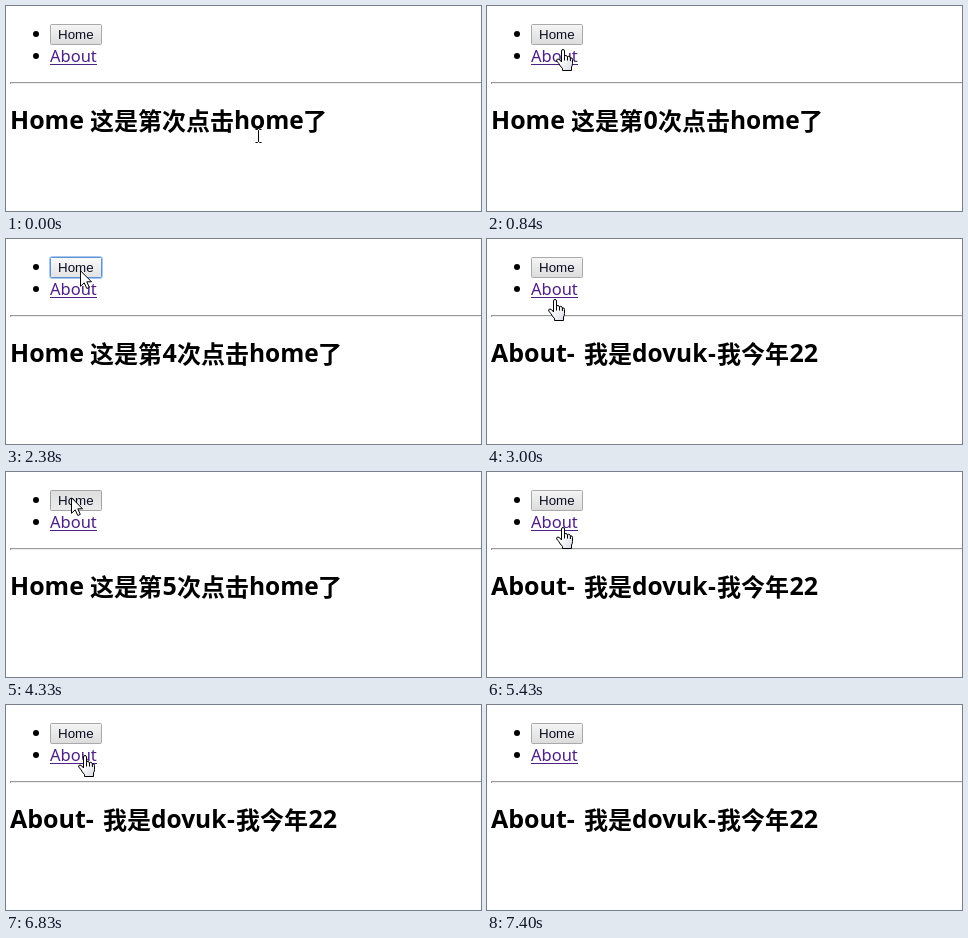
Write an HTML page that moves like this. It is 475 px wide and 205 px high and loops after 8.08 s.

```html
<!DOCTYPE html>
<html lang="zh-CN">
<head>
<meta charset="utf-8">
<title>Home / About</title>
<style>
  html, body { margin: 0; width: 100%; height: 100%; overflow: hidden; background: #fff; }
  svg { display: block; width: 475px; height: 205px; }
  text { font-family: "Open Sans", "Noto Sans", "Noto Sans CJK SC", "Noto Sans CJK", sans-serif; white-space: pre; }
  #title { font-size: 24px; font-weight: 700; }
  #title .latin { font-size: 24.5px; }
  #title .lead { font-size: 25px; }
  .link { font-family: "Noto Sans", "Open Sans", sans-serif; font-size: 16.5px; fill: #4f2085; }
  .label { font-family: "Liberation Sans", Arial, sans-serif; font-size: 13.333px; fill: #0c0c22; }
  #face { fill: url(#normal); stroke: #a9a9a9; }
  .hover #face { fill: url(#over); stroke: #989898; }
  .press #face { fill: url(#down); stroke: #a4a4a4; }
  .focus #face { stroke: #5b92d2; }
  #glow { fill: none; stroke: #a9c8ee; visibility: hidden; }
  .focus #glow { visibility: visible; }
  .cursor { visibility: hidden; stroke: #000; fill: #fff; stroke-linejoin: round; }
  .cursor.on { visibility: visible; }
  #hand { fill: url(#palm); }
</style>
</head>
<body>
<svg viewBox="0 0 475 205">
  <defs>
    <linearGradient id="normal" x2="0" y2="1"><stop stop-color="#f5f5f5"/><stop offset="1" stop-color="#dcdcdc"/></linearGradient>
    <linearGradient id="over" x2="0" y2="1"><stop stop-color="#fafafa"/><stop offset="1" stop-color="#e2e2e2"/></linearGradient>
    <linearGradient id="down" x2="0" y2="1"><stop stop-color="#dedede"/><stop offset="1" stop-color="#ececec"/></linearGradient>
    <linearGradient id="palm" y2="1"><stop offset=".4" stop-color="#fff"/><stop offset="1" stop-color="#d9dbe4"/></linearGradient>
  </defs>

  <circle cx="30" cy="28" r="3"/>
  <circle cx="30" cy="50" r="3"/>

  <g id="button">
    <rect id="glow" x="43.5" y="17.5" width="53" height="22" rx="2"/>
    <rect id="face" x="44.5" y="18.5" width="51" height="20" rx="1"/>
    <text class="label" x="52" y="33">Home</text>
  </g>

  <text class="link" x="44" y="56">About</text>
  <rect class="link" x="44" y="58" width="47" height="1"/>

  <path fill="#9a9a9a" d="M4 76H475V77H5V78H4Z"/>
  <rect x="5" y="77" width="470" height="1" fill="#eee"/>

  <text id="title"></text>

  <g class="cursor" id="beam">
    <path fill="none" d="M-3.5-6.5H-1.5L-.5-5.5 .5-6.5H2.5M-.5-5.5V5.5M-3.5 6.5H-1.5L-.5 5.5 .5 6.5H2.5"/>
  </g>
  <g class="cursor" id="arrow">
    <path d="M.5 .8V16.3L4.2 12.8 6.8 18.5 9.3 17.4 6.8 11.8H11.5Z"/>
  </g>
  <g class="cursor" id="hand">
    <path d="M-.5 13V2Q-.5 .5 1 .5T2.5 2V7.5Q2.7 6.3 4 6.5T5.5 8Q6 7 7.2 7.4T8.3 9Q10.5 8.2 10.5 10.5V14.5Q10.5 16.5 9.5 18V21.5H.5V19.5Q-2 17-3.2 14.5L-5.3 12Q-5.8 10.2-4 10-2.2 10.2-.5 13Z"/>
    <path fill="none" d="M2.5 7.5V11.5M5.5 8V11.5M8.4 9V12"/>
  </g>
</svg>
<script>
const LOOP = 8080;
const $ = id => document.getElementById(id);

// [time, kind, x, y], x and y at the hot spot
const moves = [
  [0, 'beam', 253, 130], [70, 'arrow', 214, 92], [130, 'arrow', 165, 68],
  [190, 'arrow', 124, 50], [250, 'arrow', 98, 40], [310, 'arrow', 84, 33],
  [510, 'arrow', 80, 32], [760, 'arrow', 76, 37], [840, 'hand', 75, 43],
  [1010, 'arrow', 75, 36], [1080, 'arrow', 74, 33], [1150, 'arrow', 74, 31],
  [2530, 'arrow', 74, 32], [2700, 'hand', 67, 60],
  [3170, 'hand', 67, 52], [3250, 'arrow', 66, 37], [3320, 'arrow', 65, 30], [3390, 'arrow', 65, 25],
  [4950, 'arrow', 70, 37], [5030, 'hand', 75, 53], [5200, 'hand', 75, 55],
  [5580, 'hand', 76, 50], [5650, 'arrow', 76, 38], [5730, 'arrow', 76, 35], [5800, 'arrow', 76, 33],
  [6590, 'arrow', 77, 37], [6660, 'hand', 78, 50],
  [7300, 'arrow', 102, 54], [7400, 'none', 0, 0]
];

const pages = [
  [0, ''], [670, '0'], [1380, '1'], [1690, '2'], [2070, '3'], [2380, '4'],
  [2930, 'about'], [3960, '5'], [4490, '6'], [4870, '7'],
  [5350, 'about'], [6130, '8'], [6360, '9'], [6830, 'about']
];

const presses = [
  [590, 670], [1320, 1380], [1610, 1690], [1940, 2070], [2250, 2380],
  [3860, 3960], [4330, 4490], [4790, 4870], [5960, 6130]
];
const focus = [[1690, 2930], [4870, 5350], [6360, 6830]];

const current = (track, t) => track.findLast(step => step[0] <= t);
const within = (spans, t) => spans.some(([from, to]) => t >= from && t < to);

function homeRuns(count) {
  const shift = count ? 15 : 0;
  return [
    [4, 'Home'], [84, '这是第'], [156.5, count], [156 + shift, '次点击'],
    [228 + shift, 'home'], [297 + shift, '了']
  ];
}

const aboutRuns = [
  [4, 'About-'], [97, '我是'], [145, 'dovuk'], [221, '-'], [230, '我今年'], [302.5, '22']
];

let shown = null;
function showPage(page) {
  if (page === shown) return;
  shown = page;
  const runs = page === 'about' ? aboutRuns : homeRuns(page);
  $('title').replaceChildren(...runs.filter(run => run[1]).map(([x, text]) => {
    const span = document.createElementNS('http://www.w3.org/2000/svg', 'tspan');
    const latin = /^[\w-]+$/.test(text);
    span.setAttribute('x', x);
    span.setAttribute('y', latin ? 123 : 123.5);
    if (latin) span.setAttribute('class', /^[A-Z\d]/.test(text) ? 'lead' : 'latin');
    span.textContent = text;
    return span;
  }));
}

function draw(t) {
  showPage(current(pages, t)[1]);

  const [, kind, x, y] = current(moves, t);
  for (const id of ['beam', 'arrow', 'hand']) {
    $(id).classList.toggle('on', id === kind);
    $(id).setAttribute('transform', `translate(${x} ${y})`);
  }

  const over = kind === 'arrow' && x >= 44 && x < 96 && y >= 18 && y < 39;
  const state = $('button').classList;
  state.toggle('hover', over);
  state.toggle('press', within(presses, t));
  state.toggle('focus', within(focus, t));
}

const start = performance.now();
function tick() {
  draw((performance.now() - start) % LOOP);
  requestAnimationFrame(tick);
}
tick();
</script>
</body>
</html>
```
